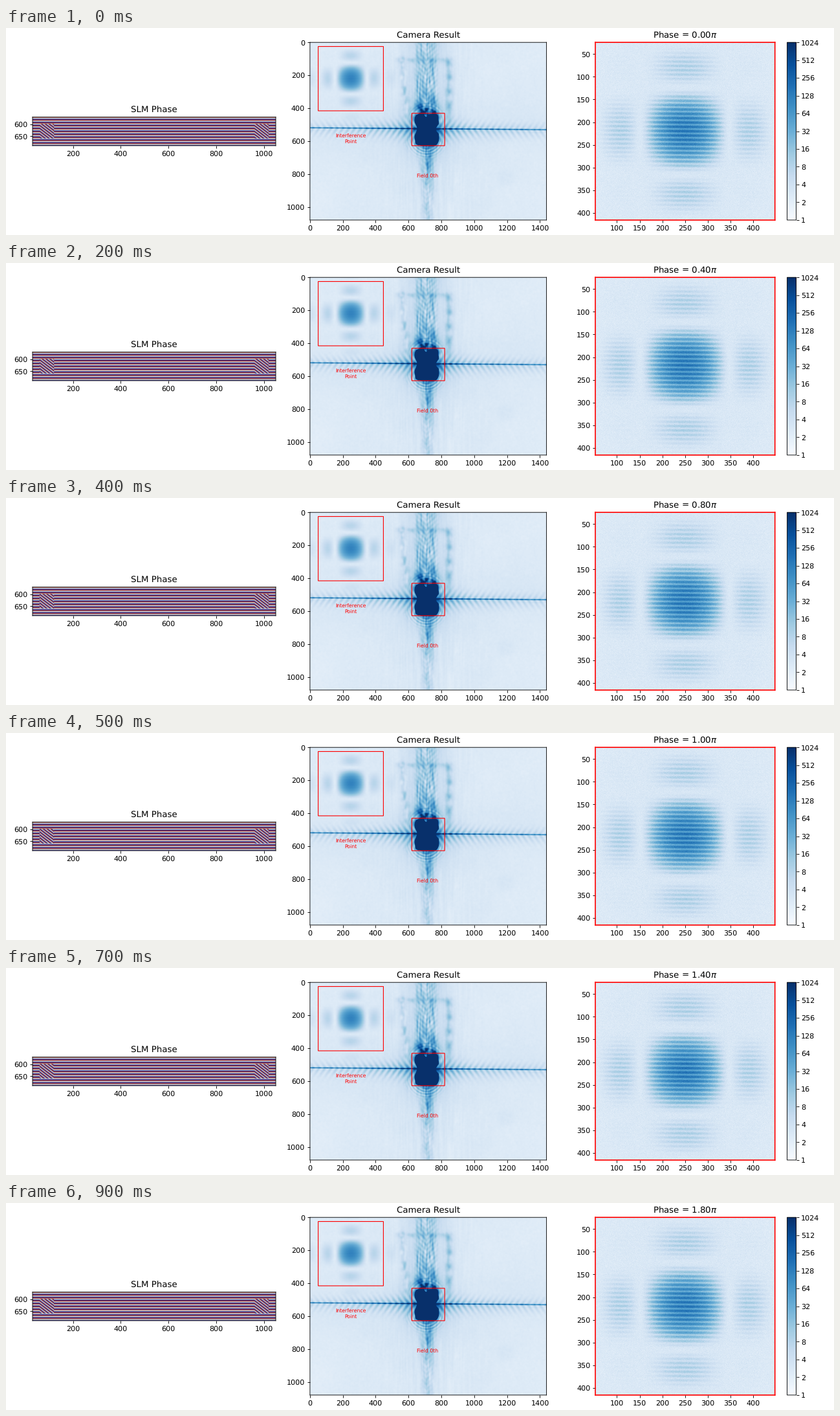
A matplotlib script for the animation above (1000 ms loop, 1280x320 px).

```python
import numpy as np
import matplotlib.pyplot as plt
from matplotlib.animation import FuncAnimation
from matplotlib.cm import ScalarMappable
from matplotlib.colors import LogNorm
from matplotlib.patches import Rectangle

W, H, DPI = 1280, 320, 80
FRAMES, INTERVAL = 10, 100
FRINGE = 9.6             # fringe period in camera pixels
GRATING = 12             # SLM grating period in rows
SPOT = (249, 220)        # interference spot centre
CAM_LEFT, CAM_TOP, CAM_SCALE = 469.9, 22.2, 0.254

plt.rcParams.update({"font.family": "DejaVu Sans", "text.hinting": "none"})
rng = np.random.default_rng(7)
fig = plt.figure(figsize=(W / DPI, H / DPI), dpi=DPI, facecolor="white")


def axes_px(left, top, right, bottom):
    return fig.add_axes([left / W, 1 - bottom / H,
                         (right - left) / W, (bottom - top) / H])


def unsnap(ax):
    """Keep frame and tick lines at their exact sub-pixel places."""
    for artist in (*ax.spines.values(), *ax.patches,
                   *ax.get_xticklines(), *ax.get_yticklines()):
        artist.set_snap(False)


def gauss(t, width, power=2):
    return np.exp(-np.abs(t / width) ** power)


def step(t, soft=1.0):
    return 1 / (1 + np.exp(-np.clip(t / soft, -40, 40)))


def texture(shape, sx, sy):
    """Unit-variance noise blurred by sx, sy pixels."""
    field = rng.normal(size=shape)
    for axis, s in ((1, sx), (0, sy)):
        t = np.arange(-int(3 * s) - 1, int(3 * s) + 2)
        kernel = np.exp(-t ** 2 / (2 * s * s))
        field = np.apply_along_axis(np.convolve, axis, field, kernel, "same")
    return field / field.std()


def spot(x, y, phase, contrast):
    """Two-beam interference of square apertures."""
    u, v = x - SPOT[0], y - SPOT[1]
    envelope = np.sinc(u / 99) ** 2 * np.sinc(v / 97) ** 2
    envelope = envelope * gauss(np.hypot(u, v), 330, 4)
    fringes = 1 + contrast * np.cos(2 * np.pi * (v - 0.01 * u) / FRINGE + phase)
    return 112 * envelope * fringes


def slm_phase(phase):
    x, y = np.meshgrid(np.arange(30, 1050), np.arange(570, 690))
    cycles = y / GRATING
    rows = (y >= 600) & (y < 660)
    for x0, shift in ((60, phase / (2 * np.pi)), (960, 0)):
        patch = rows & (x >= x0) & (x < x0 + 60)
        cycles = np.where(patch, (y - 600) / GRATING - (x - x0) / 16 + shift,
                          cycles)
    return np.mod(cycles, 1)


def camera_scene(X, Y):
    """Static log2 intensity of the camera picture, in stage pixels."""
    shape = X.shape
    dx, dy = X - 650, Y - 157.5
    fine = texture(shape, 0.8, 2.2)
    streak = texture(shape, 1.0, 5)
    blot = texture(shape, 1.8, 2.5)

    z = 1.15 + 0.3 * gauss(dx, 130) + 0.25 * gauss(dy, 60)
    z += 0.05 * texture(shape, 1, 1) + 0.05 * texture(shape, 12, 12)
    z += 0.12 * gauss(dx, 70) * texture(shape, 0.9, 14)
    z += 0.25 * gauss(X - 772, 11, 4) * gauss(Y - 232, 11, 4)

    # vertical column above and below the core
    up = dy < 0
    fan = np.cos(2 * np.pi * (np.abs(dx) * 0.12 + dy * 0.13))
    above = (1.5 + 0.7 * streak + 0.4 * fan) * gauss(dx, 17, 4)
    above = above * (0.85 + 0.9 * np.exp(-np.abs(dy) / 45))
    width = 8 + 8 * np.exp(-np.abs(dy) / 45)
    below = (2.4 + 0.7 * streak + 0.3 * fan) * gauss(dx - 2, width)
    below = below * (0.55 + 1.5 * np.exp(-np.abs(dy) / 55))
    z += np.where(up, above, below)
    z += 0.7 * gauss(dx, 36, 4) * np.where(up, 1, np.exp(-np.abs(dy) / 60))
    z += (2.6 + 1.2 * blot) * gauss(dx, 20, 4) * gauss(dy + 28, 13)

    # dotted strands and the band that joins them
    span = step(Y - 46, 3) * step(140 - Y, 5)
    z += (0.9 + 0.5 * blot) * gauss(X - 612 - (Y - 50) * 0.09, 6) * span
    beads = 0.5 + 0.5 * np.cos(2 * np.pi * (Y - 75) / 22.5)
    z += (0.9 + 1.1 * beads + 0.3 * blot) * gauss(X - 685, 6) * span
    z += (0.7 + 0.3 * blot) * gauss(Y - 50, 4) * gauss(X - 648, 44, 8)

    # bright horizontal line with feathered streaks
    d = Y - (154.4 + (X - CAM_LEFT) * 3 / 365)
    feather = np.cos(2 * np.pi * (np.abs(dx) - 0.7 * np.abs(d)) / 9.2)
    fade = np.exp(-np.abs(dx) / 110)
    reach = 11 + 7 * np.exp(-np.abs(dx) / 60)
    z += (0.8 + 0.7 * feather) * gauss(d - 2, reach) * (0.6 + 1.3 * fade)
    z += 1.2 * gauss(d, 6) * fade
    z += (4.4 + 1.2 * fade + 0.3 * fine) * gauss(d, 1.0)

    # halo and diffraction rings hugging the core
    z += 1.5 * gauss(np.hypot(dx, dy), 38)
    for cy, side in ((170, 1), (146, -1)):
        r = np.hypot(dx, Y - cy)
        ring = np.cos(2 * np.pi * r / 4.2) * gauss(r - 22, 8)
        z += (0.8 if side > 0 else 0.45) * ring * step(side * (Y - cy) - 3, 2)
    z += (0.9 + 0.6 * blot) * gauss(dx, 23, 4) * gauss(dy, 27, 4)

    # saturated core with notches on each side
    edge = 1 - (np.abs(dx) / 18.5) ** 6 - (np.abs(dy) / 24) ** 6
    edge -= 1.9 * gauss(np.abs(dx) - 19, 6) * gauss(dy + 1, 6)
    edge -= 1.6 * gauss(dx, 3) * gauss(dy + 25, 6)
    z += 9 * step(edge + 0.12 * blot, 0.14)
    return np.clip(z, 0, 10)


# SLM panel
slm_ax = axes_px(41, 137.7, 417, 181.9)
slm_img = slm_ax.imshow(slm_phase(0), cmap="twilight", vmin=0, vmax=1,
                        extent=(30, 1050, 690, 570), aspect="auto",
                        interpolation="antialiased", interpolation_stage="rgba")
slm_ax.set_title("SLM Phase")
slm_ax.set_xticks(range(200, 1001, 200))
slm_ax.set_yticks([600, 650])

# camera panel
cam_ax = axes_px(CAM_LEFT, CAM_TOP, 835.6, 296.9)
px, py = np.meshgrid(CAM_LEFT + np.arange(366) + 0.5,
                     CAM_TOP + np.arange(275) + 0.5)
cam_x, cam_y = (px - CAM_LEFT) / CAM_SCALE, (py - CAM_TOP) / CAM_SCALE
scene = 2 ** camera_scene(px, py)
cam_img = cam_ax.imshow(np.log2(scene), cmap="Blues", vmin=0, vmax=10,
                        extent=(0, 1440, 1080, 0), aspect="auto",
                        interpolation="nearest")
cam_ax.set_title("Camera Result")
cam_ax.set_xticks(range(0, 1401, 200))
cam_ax.set_yticks(range(0, 1001, 200))
for x0, y0, x1, y1 in ((50, 25, 447, 416), (620, 431, 820, 628)):
    cam_ax.add_patch(Rectangle((x0, y0), x1 - x0, y1 - y0,
                               fill=False, ec="red", lw=1))
for x, y, label in ((533, 171, "Interference\nPoint"), (652, 229, "Field 0th")):
    fig.text(x / W, 1 - y / H, label, color="red", fontsize=7,
             ha="center", va="center")

# zoomed panel
zoom_ax = axes_px(911, 22.2, 1188.7, 296.9)
zoom_x, zoom_y = np.meshgrid(np.linspace(52.5, 447.5, 278),
                             np.linspace(24.3, 415.7, 275))
zoom_img = zoom_ax.imshow(np.zeros(zoom_x.shape), cmap="Blues", vmin=0, vmax=10,
                          extent=(52.5, 447.5, 415.7, 24.3), aspect="auto",
                          interpolation="nearest")
zoom_ax.set_xticks(range(100, 401, 50))
zoom_ax.set_yticks(range(50, 401, 50))
for spine in zoom_ax.spines.values():
    spine.set(color="red", linewidth=1.5)
title = zoom_ax.set_title("")
glow = 2.35 + 0.5 * gauss(zoom_x - 250, 170) + 0.2 * gauss(zoom_y - 220, 120)

# colour scale
bar_ax = axes_px(1207.5, 22.2, 1221.5, 296.9)
bar = fig.colorbar(ScalarMappable(LogNorm(1, 1024), "Blues"), cax=bar_ax,
                   ticks=2 ** np.arange(11), format="%d")
bar.ax.minorticks_off()

for ax in (slm_ax, cam_ax, zoom_ax, bar_ax):
    unsnap(ax)


def update(i):
    phase = 2 * np.pi * i / FRAMES
    noise = np.random.default_rng(100 + i).normal(0, 0.18, zoom_x.shape)
    slm_img.set_data(slm_phase(phase))
    cam_img.set_data(np.log2(scene + spot(cam_x, cam_y, phase, 0.15)))
    zoom_img.set_data(np.log2(glow + spot(zoom_x, zoom_y, phase, 0.62)) + noise)
    title.set_text(rf"Phase = ${2 * i / FRAMES:.2f}\pi$")
    return slm_img, cam_img, zoom_img, title


update(0)
anim = FuncAnimation(fig, update, frames=FRAMES, interval=INTERVAL,
                     repeat=True, repeat_delay=0, blit=False)
plt.show()
```
